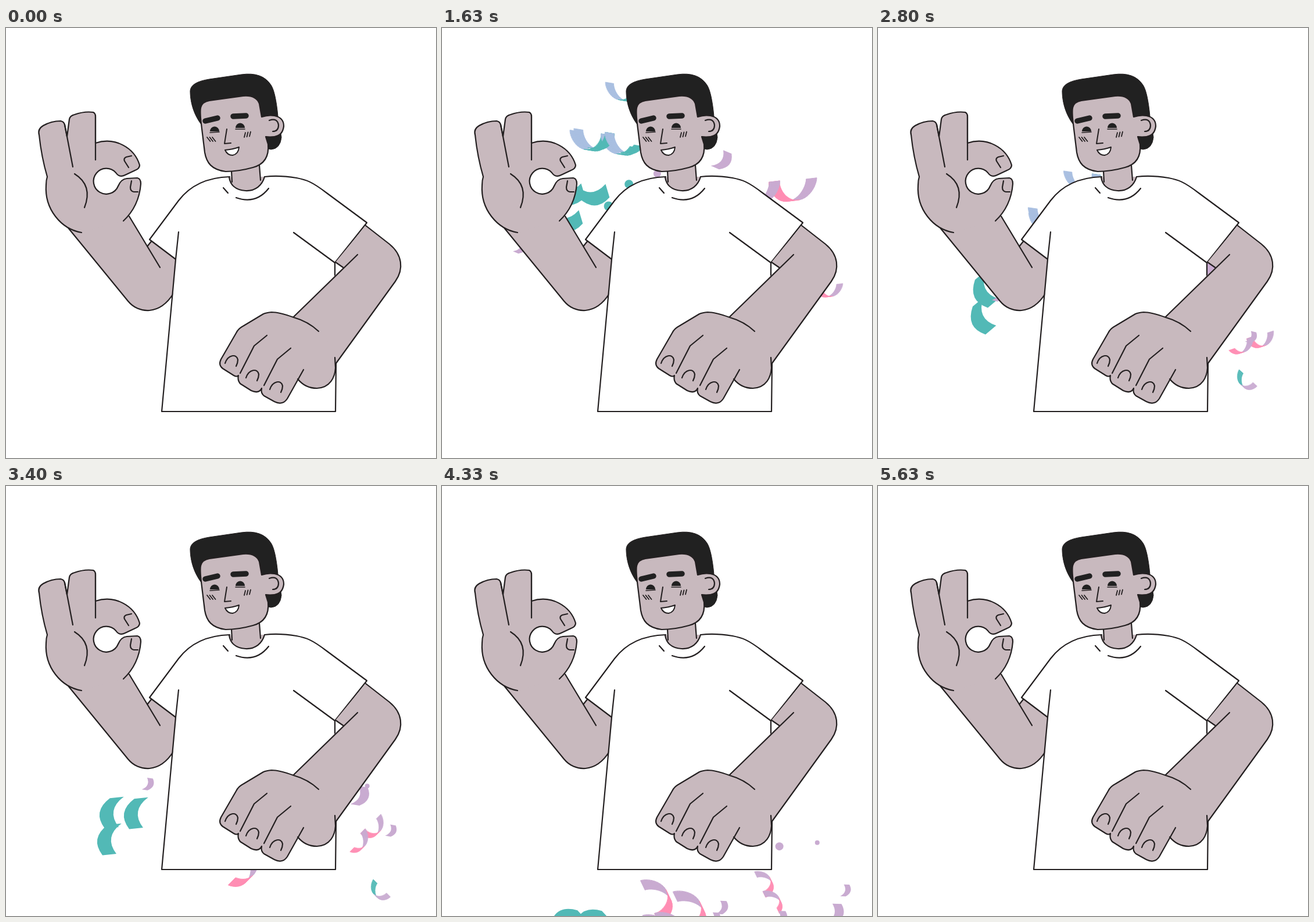
An HTML page with a canvas that plays this animation: 740 px wide and 740 px high, repeating every 6430 ms.

```html
<!DOCTYPE html>
<html lang="en">
<head>
<meta charset="utf-8">
<title>Confetti cheer</title>
<style>
html, body { margin: 0; width: 100%; height: 100%; overflow: hidden; background: #fff; }
canvas { display: block; width: 740px; height: 740px; }
</style>
</head>
<body>
<canvas id="stage" width="740" height="740"></canvas>
<script>
const ctx = document.getElementById('stage').getContext('2d');
const SKIN = '#c8b9be', INK = '#231f20', HAIR = '#212121', WHITE = '#fff';
const BLUE = '#a9bfe1', TEAL = '#52b9b6', LILAC = '#c9abd1', PINK = '#ff8db3';
const LOOP = 6430, START = 0.13, PEAK = 0.8, END = 5.63;
const ORIGIN = { x: 0, y: 740 };
const DRAG = 0.8;

// ---- confetti shapes ----
// A coil swept along a fixed direction; its side decides the colour.
function ribbon([front, back], turns = 3.4) {
  const steps = 48, wx = 6, wy = 3.8, mid = turns * Math.PI / 2;
  const at = a => [
    6.7 * (a - mid) - 9 * Math.sin(a) + 3 * Math.cos(a),
    4 * (a - mid) - 13.5 * Math.cos(a)
  ];
  ctx.lineWidth = 0.7;
  for (let i = 0; i < steps; i++) {
    const [x, y] = at(turns * Math.PI * i / steps);
    const [X, Y] = at(turns * Math.PI * (i + 1) / steps);
    ctx.fillStyle = ctx.strokeStyle = (X - x) * wy - (Y - y) * wx < 0 ? front : back;
    ctx.beginPath();
    ctx.moveTo(x - wx, y - wy);
    ctx.lineTo(x + wx, y + wy);
    ctx.lineTo(X + wx, Y + wy);
    ctx.lineTo(X - wx, Y - wy);
    ctx.closePath();
    ctx.fill();
    ctx.stroke();
  }
}
const curl = colors => ribbon(colors, 1.7);

const CHIP = new Path2D('M-12-25Q7 6-26 26L-2 26Q31 6 12-25Z');
function chip([color]) {
  ctx.fillStyle = color;
  ctx.fill(CHIP);
}

function dot([color]) {
  ctx.fillStyle = color;
  ctx.beginPath();
  ctx.arc(0, 0, 1, 0, Math.PI * 2);
  ctx.fill();
}

// ---- confetti motion ----
// bend and sway act sideways; turn, spin and roll set the angle in degrees.
function kind(draw, colors, motion = {}) {
  return { draw, colors, bend: 0, sway: 0, turn: 0, spin: 0, roll: 0, ...motion };
}
const sky = kind(ribbon, [BLUE, TEAL], { spin: -39, roll: 13.5 });
const rose = kind(ribbon, [LILAC, PINK], { bend: -18, spin: 47, roll: -20 });
const mixed = kind(curl, [TEAL, LILAC], { spin: 5 });
const tealChip = kind(chip, [TEAL], { sway: 21, turn: 26, spin: 57 });
const lilacChip = kind(chip, [LILAC], { turn: 30, spin: -8 });
const tealDot = kind(dot, [TEAL]), lilacDot = kind(dot, [LILAC]);

// Each piece has its highest point, size, sideways and falling speed.
const pieces = [];
function add(type, x, y, size, drift, fall) {
  pieces.push({ type, x, y, size, drift, fall });
}

add(sky, 305, 70, 1, 33, 195);
add(sky, 249, 160, 1.1, 33, 170);
add(sky, 260, 154, 1.1, 28, 185);
add(sky, 380, 110, 0.7, 48, 183);
// A negative size mirrors the piece.
add(rose, 567, 232, -1.3, 28, 222);
add(rose, 625, 428, -0.75, 46, 114);
add(rose, 400, 340, -1.25, 59, 167);
add(rose, 400, 360, -1.25, 60, 184);
add(mixed, 600, 430, 0.65, 16, 178);

add(tealChip, 240, 239, 1, 0, 216);
add(tealChip, 194, 284, 1, 0, 216);
add(tealChip, 198, 238, 1, 0, 216);
add(lilacChip, 85, 355, 0.42, 62, 105);
add(lilacChip, 313, 273, 0.5, 77, 200);
add(lilacChip, 265, 325, 0.45, 62, 170);
add(lilacChip, 252, 345, 0.45, 62, 170);
add(lilacChip, 388, 252, 0.6, 57, 229);
add(lilacChip, 425, 175, 0.65, 72, 238);
add(lilacChip, 576, 411, 0.4, 34, 121);

add(tealDot, 280, 275, 8, 8, 141);
add(tealDot, 291, 262, 7.5, 37, 30);
add(tealDot, 340, 202, 7, 40, 100);
add(lilacDot, 333, 213, 6.5, 45, 168);
add(lilacDot, 450, 300, 7, 37, 136);
add(lilacDot, 554, 343, 4, 26, 115);

// A quick shot from the corner, then a fall that settles to a steady speed.
function drawConfetti(t) {
  const rise = Math.min(1, (t - START) / (PEAK - START));
  const rest = Math.pow(1 - rise, 3);
  const u = Math.max(0, t - PEAK);
  const drop = u - (1 - Math.exp(-DRAG * u)) / DRAG;
  const grow = 0.4 + 0.6 * rise;
  ctx.globalAlpha = Math.min(1, (END - t) / 0.5);
  for (const { type, x, y, size, drift, fall } of pieces) {
    const angle = type.turn + type.spin * u + type.roll * u * u - 200 * rest;
    ctx.save();
    ctx.translate(
      x + (ORIGIN.x - x) * rest + drift * u + type.bend * u * u + type.sway * Math.sin(2 * u),
      y + (ORIGIN.y - y) * rest + fall * drop
    );
    ctx.rotate(angle * Math.PI / 180);
    ctx.scale(size * grow, Math.abs(size) * grow);
    type.draw(type.colors);
    ctx.restore();
  }
  ctx.globalAlpha = 1;
}

// ---- figure ----
const figure = [];
function part(d, fill, line = 2.2, color = INK) {
  figure.push({ path: new Path2D(d), fill, line, color });
}

// raised arm
part('M107 344L210 470C228 492 264 497 290 456L296 398L250 366L243 376L212 324L150 300Z', SKIN, 0);
part('M107 344L210 470C228 492 264 495 288 457M212 324L265 412M243 376L251 366');
part('M150 264a23 23 0 0 1 46 0a23 23 0 0 1-46 0Z', WHITE, 0);
part('M130 352C95 346 66 312 69 270Q69 262 71 256Q61 222 57 184Q54 174 64 168Q78 160 94 160' +
  'Q100 161 101 167L105 187L109 157Q110 151 118 149Q135 143 150 145Q154 147 154 152L154 198' +
  'C188 187 221 206 230 236Q230 242 222 245L205 253Q195 258 189 249A22 22 0 1 0 193 272' +
  'Q198 260 208 259L226 258Q232 259 232 268C230 294 219 316 202 332', SKIN);
part('M101 166L115 239M154 150L154 227M118 251Q150 271 135 309');
part('M216 220L207 222Q202 224 204 229L211 240M216 263L214 274Q214 281 220 282L227 282');

// shirt
part('M385 256C352 257 319 268 297 297L247 364L293 398L268 660L567 660L566 404L621 335' +
  'L552 284C526 264 516 261 500 258Q470 253 445 256Q415 285 385 256Z', WHITE, 0);
part('M385 256C352 257 319 268 297 297L247 364L292 398M297 351L292 398L268 660L567 660L568 575' +
  'M566 430L566 404L495 352M566 404L621 335L552 284C526 264 516 261 500 258Q470 253 445 256');

// neck and collar
part('M388 240L388 257L384 257C386 270 395 279 412 280C430 281 441 270 445 256L438 256L436 232Z', SKIN, 0);
part('M388 246L389 265M436 236L438 262M384 257C386 270 395 279 412 280C430 281 441 270 445 256');
part('M396 292Q430 304 452 276M374 275L382 284');

// head
part('M336 166C321 146 317 124 317 108Q318 93 350 88L405 80Q441 75 456 98Q464 110 468 152' +
  'L474 188Q472 208 456 209L440 205L420 140Z', HAIR, 1);
part('M336 165C333 140 332 128 350 125L408 117Q430 115 436 130L440 153Q452 149 462 151Q478 154 478 169' +
  'Q476 185 462 187Q454 188 447 187L451 200Q454 232 425 240Q400 247 378 247C354 244 345 232 342 214Z', SKIN);
part('M453 159Q467 154 469 167Q469 178 459 178');
part('M343 160L364 155M391 152L413 151', null, 9.5, HAIR);
part('M351 178A7.5 8 0 0 1 367 178ZM395 172A7.5 8 0 0 1 411 172Z', HAIR, 0);
part('M351 180L367 179M395 174L411 174', null, 1.6);
part('M380 174L376 199L387 198', null, 2);
for (let x = 0; x < 12; x += 4.5) {
  part(`M${346 + x} 188l5.5 7M${412 + x} ${180 - x / 6}l-2 8`, null, 1.8);
}
part('M377 210Q390 209 401 205Q400 217 390 219Q381 219 377 210Z', WHITE, 2);

// lowered arm
part('M567 403L619 340L660 372C682 390 685 415 670 436L568 577L530 570L495 497L580 412Z', SKIN, 0);
part('M619 340L660 372C682 390 685 415 670 436L568 577M605 390L495 497M567 403L580 412');
const knuckles = 'Q470 489 457 489Q448 490 443 492L408 513Q400 517 396 525L370 570Q365 580 373 586L392 598' +
  'Q397 601 400 598Q398 606 403 612L422 624Q435 630 440 620Q438 628 444 633L462 643Q476 650 484 638';
const thumb = '502 604Q515 620 535 620C558 619 566 601 567 585L566 567';
part('M495 498' + knuckles + 'L' + thumb + 'L545 520Z', SKIN, 0);
part('M538 522Q520 505 495 498' + knuckles + 'L512 588M' + thumb);
part('M449 529L427 547L403 594M490 551L467 570L444 615');
for (const [x, y] of [[377, 577], [413, 602], [454, 622]]) {
  part(`M${x} ${y}c5-15 20-17 22-6q0 5-3 11`);
}

function drawFigure() {
  ctx.lineCap = ctx.lineJoin = 'round';
  for (const { path, fill, line, color } of figure) {
    if (fill) {
      ctx.fillStyle = fill;
      ctx.fill(path);
    }
    if (line) {
      ctx.lineWidth = line;
      ctx.strokeStyle = color;
      ctx.stroke(path);
    }
  }
}

// The picture changes twice every 100 ms, after 30 and 70 ms in turn.
function frame() {
  const ms = performance.now() % LOOP, base = Math.floor(ms / 100) * 100;
  const t = (ms - base < 30 ? base : base + 30) / 1000;
  ctx.fillStyle = WHITE;
  ctx.fillRect(0, 0, 740, 740);
  if (t >= START && t < END) drawConfetti(t);
  drawFigure();
  requestAnimationFrame(frame);
}
frame();
</script>
</body>
</html>
```
